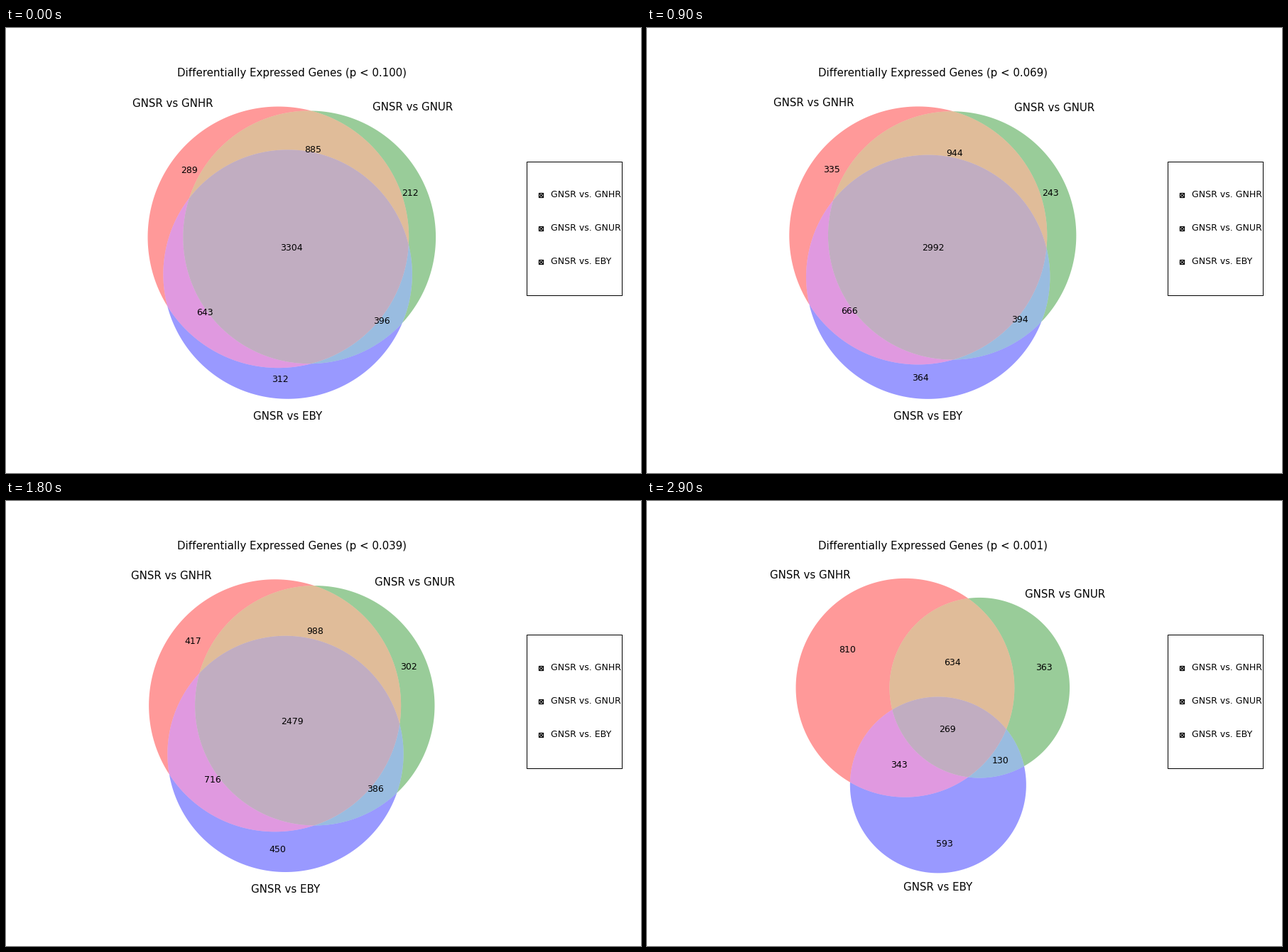
A matplotlib script that plays this animation: 894 px wide and 626 px high, repeating every 3000 ms.

```python
import numpy as np
import matplotlib.pyplot as plt
from matplotlib.animation import FuncAnimation
from matplotlib.patches import Polygon

W, H, DPI = 894, 626, 90
N_FRAMES, INTERVAL = 30, 100
NAMES = ["GNHR", "GNUR", "EBY"]
P_VALUES = np.linspace(0.1, 0.001, N_FRAMES)

# Region counts at some thresholds: A, B, C, BC, AC, AB, ABC
KNOTS = [0, 6, 12, 18, 22, 26, 29]
COUNTS = np.array([
    [289, 212, 312, 396, 643, 885, 3304],
    [317, 230, 342, 396, 655, 921, 3118],
    [356, 260, 390, 390, 681, 967, 2843],
    [417, 302, 450, 386, 716, 988, 2479],
    [467, 346, 502, 360, 705, 1029, 2125],
    [579, 401, 583, 350, 675, 1011, 1504],
    [810, 363, 593, 130, 343, 634, 269],
], float)
LOG_P = -np.log(P_VALUES)
KNOT_X = LOG_P[KNOTS]
SLOPES = np.gradient(COUNTS, KNOT_X, axis=0, edge_order=2)

RED, GREEN, BLUE = np.array([[1, 0, 0], [0, 0.5, 0], [0, 0, 1]])
COLORS = [RED, GREEN, BLUE,
          0.7 * (GREEN + BLUE), 0.7 * (RED + BLUE), 0.7 * (RED + GREEN),
          0.4 * (RED + GREEN + BLUE)]


def counts_at(i):
    """Cubic Hermite interpolation of the counts over log p."""
    x = LOG_P[i]
    k = min(np.searchsorted(KNOT_X, x, side="right") - 1, len(KNOTS) - 2)
    h = KNOT_X[k + 1] - KNOT_X[k]
    t = (x - KNOT_X[k]) / h
    value = ((1 + 2 * t) * (1 - t) ** 2 * COUNTS[k]
             + t * (1 - t) ** 2 * h * SLOPES[k]
             + t * t * (3 - 2 * t) * COUNTS[k + 1]
             + t * t * (t - 1) * h * SLOPES[k + 1])
    return np.rint(value).astype(int)


def lens_area(r, s, d):
    a = np.arccos(np.clip((d * d + r * r - s * s) / (2 * d * r), -1, 1))
    b = np.arccos(np.clip((d * d + s * s - r * r) / (2 * d * s), -1, 1))
    return r * r * (a - np.sin(2 * a) / 2) + s * s * (b - np.sin(2 * b) / 2)


def distance_for(r, s, area):
    lo, hi = abs(r - s) + 1e-9, r + s
    for _ in range(45):
        mid = (lo + hi) / 2
        if lens_area(r, s, mid) > area:
            lo = mid
        else:
            hi = mid
    return (lo + hi) / 2


def layout(counts):
    """Centres and radii of three circles with the given region areas."""
    areas = counts / counts.sum()
    solo, pair, triple = areas[:3], areas[3:6], areas[6]
    radii = np.sqrt((solo + pair.sum() - pair + triple) / np.pi)
    bc, ac, ab = [distance_for(radii[(m + 1) % 3], radii[(m + 2) % 3], pair[m] + triple)
                  for m in range(3)]
    x = (ac ** 2 - bc ** 2 + ab ** 2) / (2 * ab)
    centers = np.array([[0, 0], [ab, 0], [x, -np.sqrt(ac ** 2 - x ** 2)]])
    weights = radii ** 2
    return centers - weights @ centers / weights.sum(), radii


def crossings(centers, radii, m):
    """Inner and outer crossing of the two circles other than m."""
    i, j = (m + 1) % 3, (m + 2) % 3
    delta = centers[j] - centers[i]
    d = np.hypot(*delta)
    u = delta / d
    a = (d * d + radii[i] ** 2 - radii[j] ** 2) / (2 * d)
    off = np.sqrt(radii[i] ** 2 - a * a) * np.array([-u[1], u[0]])
    base = centers[i] + a * u
    return sorted([base + off, base - off], key=lambda p: np.hypot(*(p - centers[m])))


def regions(centers, radii):
    """Yield outline and label position of each region."""
    inner, outer = zip(*[crossings(centers, radii, m) for m in range(3)])

    def arc(k, start, end, turn):
        a, b = [np.arctan2(*(p - centers[k])[::-1]) for p in (start, end)]
        sweep = (turn * (b - a)) % (2 * np.pi)
        angles = a + turn * np.linspace(0, sweep, 101)
        points = centers[k] + radii[k] * np.column_stack([np.cos(angles), np.sin(angles)])
        return points, sweep

    def region(*sides):
        arcs = [arc(*side) for side in sides]
        label = np.average([pts[50] for pts, _ in arcs], axis=0,
                           weights=[sweep for _, sweep in arcs])
        return np.vstack([pts for pts, _ in arcs]), label

    for k in range(3):
        n, m = (k + 1) % 3, (k + 2) % 3
        yield region((k, outer[n], outer[m], -1),
                     (n, outer[m], inner[k], 1),
                     (m, inner[k], outer[n], 1))
    for m in range(3):
        k, n = (m + 1) % 3, (m + 2) % 3
        yield region((k, outer[m], inner[n], -1),
                     (m, inner[n], inner[k], 1),
                     (n, inner[k], outer[m], -1))
    yield region(*[(k, inner[(k + 1) % 3], inner[(k + 2) % 3], -1) for k in range(3)])


def draw(i):
    ax.clear()
    ax.set_axis_off()
    ax.set_aspect("equal")
    counts = counts_at(i)
    centers, radii = layout(counts)
    low = (centers - radii[:, None]).min(axis=0) - 0.1
    high = (centers + radii[:, None]).max(axis=0) + 0.1
    ax.set_xlim(low[0], high[0])
    ax.set_ylim(low[1], high[1])
    ax.set_title(f"Differentially Expressed Genes (p < {P_VALUES[i]:.3f})")

    for (outline, spot), color, count in zip(regions(centers, radii), COLORS, counts):
        ax.add_patch(Polygon(outline, facecolor=color, edgecolor="none", alpha=0.4))
        ax.text(*spot, str(count), ha="center", va="center")

    offsets = [(-0.5, 1), (0.5, 1), (0, -1.1)]
    aligns = [("right", "baseline"), ("left", "baseline"), ("center", "top")]
    for name, c, r, off, (ha, va) in zip(NAMES, centers, radii, offsets, aligns):
        ax.text(c[0] + r * off[0], c[1] + r * off[1], f"GNSR vs {name}",
                size="large", ha=ha, va=va)
    return []


def draw_checks():
    box = fig.add_axes([0.82, 0.4, 0.15, 0.3])
    box.set(xlim=(0, 1), ylim=(0, 1), xticks=[], yticks=[])
    ys = [0.75, 0.5, 0.25]
    xs = [0.15] * 3
    box.scatter(xs, ys, s=25, marker="s", linewidth=1, facecolor="none", edgecolor="black")
    box.scatter(xs, ys, s=25, marker="x", linewidth=1, color="black")
    for y, name in zip(ys, NAMES):
        box.text(0.25, y, f"GNSR vs. {name}", ha="left", va="center")


plt.rcParams["font.family"] = "DejaVu Sans"
fig = plt.figure(figsize=(W / DPI, H / DPI), dpi=DPI, facecolor="white")
ax = fig.add_axes([0.125, 0.11, 0.65, 0.77])
draw_checks()
anim = FuncAnimation(fig, draw, frames=N_FRAMES, interval=INTERVAL,
                     init_func=lambda: draw(0), repeat=True, repeat_delay=0, blit=False)
plt.show()
```
